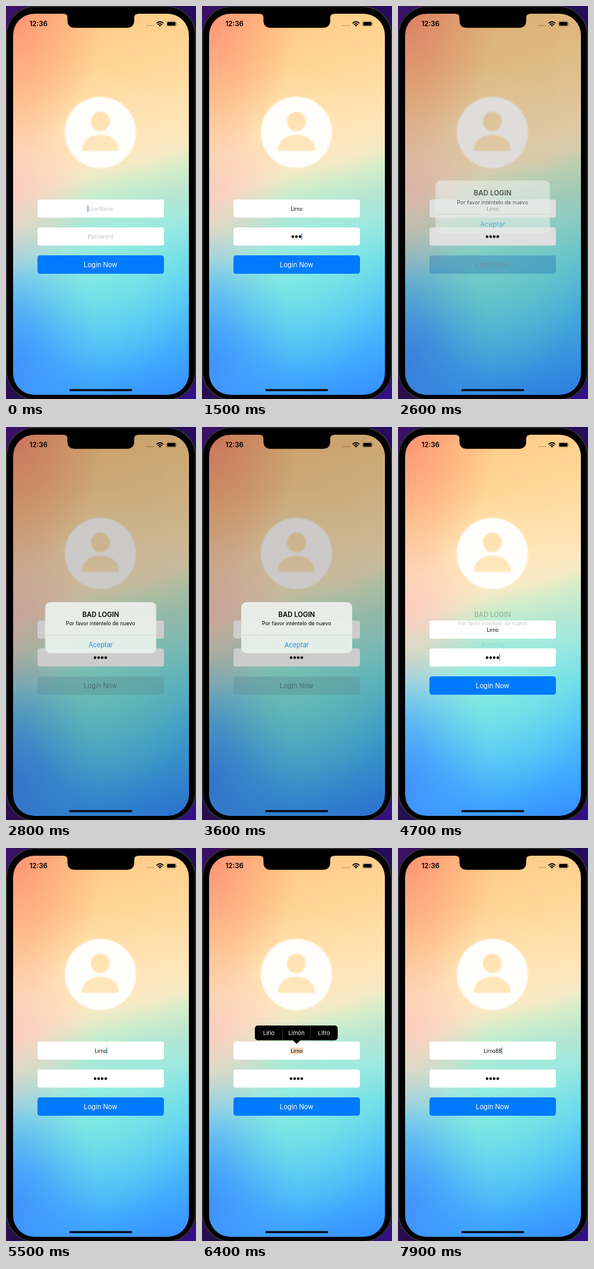
These frames come from a looping animation (320 px wide and 662 px high, 8000 ms). An HTML page:

```html
<!DOCTYPE html>
<html lang="es">
<head>
<meta charset="utf-8">
<title>Login</title>
<style>
  html, body { margin: 0; width: 100%; height: 100%; overflow: hidden; }
  body { position: relative; background: linear-gradient(100deg, #3c1268, #1a0a3c 50%, #34108a); }
  .phone, .screen, svg { position: absolute; }
  .phone {
    left: 0; top: 0; width: 316px; height: 660px;
    border: 2px solid #2e2e32; border-radius: 49px; background: #000;
  }
  .screen {
    left: 11.5px; top: 13px; width: 296px; height: 641.5px; border-radius: 36px;
    background:
      radial-gradient(150px 240px at 0 0, rgba(255, 130, 112, .7), transparent),
      radial-gradient(130px 150px at 0 46%, rgba(250, 192, 190, .7), transparent),
      radial-gradient(150px 120px at 45% 32%, rgba(255, 232, 192, .45), transparent),
      radial-gradient(150px 190px at 54% 66%, rgba(135, 242, 224, .5), transparent),
      radial-gradient(150px 230px at 0 92%, rgba(62, 138, 255, .85), transparent),
      linear-gradient(163deg, #ffba78, #ffca86 6%, #ffd696 20%, #ffe6ba 38%, #f4eac6 43%,
        #d4ecca 47%, #b8e6d2 53%, #a2e8de 59%, #74dee8 68%, #54c8f6 78%, #3ca4ff 92%, #378cff);
  }
  svg { left: 0; top: 0; }
  text { font-family: Inter, "Liberation Sans", sans-serif; text-anchor: middle; }
  .small { font-size: 8.3px; }
  .hint { fill: #c4c4c8; }
  .caret { fill: #2c7fb4; }

  .dim, .alert, .plate, .label, .press, .tint, .grey, .menu { animation: 8s linear infinite; }
  .dim { animation-name: dim; }
  .alert { animation-name: zoom; transform-origin: 159.5px 338px; }
  .plate { animation-name: plate; }
  .label { animation-name: label; }
  .press { animation-name: press; }
  .tint { animation-name: tint; }
  .grey { animation-name: grey; }
  .menu { animation-name: menu; }

  @keyframes dim {
    0%, 30% { opacity: 0; }
    34%, 56.5% { opacity: .2; }
    58.8%, 100% { opacity: 0; }
  }
  @keyframes zoom {
    0%, 30% { transform: scale(1.2); animation-timing-function: cubic-bezier(.2, .7, .3, 1); }
    36.5%, 100% { transform: none; }
  }
  @keyframes plate {
    0%, 30% { opacity: 0; }
    34%, 56.5% { opacity: 1; }
    58.8%, 100% { opacity: 0; }
  }
  @keyframes label {
    0%, 30% { opacity: 0; }
    34%, 56.5% { opacity: 1; }
    59.4%, 100% { opacity: 0; }
  }
  @keyframes press {
    0%, 54% { opacity: 0; }
    55%, 56.5% { opacity: 1; }
    58.7%, 100% { opacity: 0; }
  }
  @keyframes tint {
    0%, 30% { opacity: 1; }
    33.5%, 56.5% { opacity: 0; }
    58.6%, 100% { opacity: 1; }
  }
  @keyframes grey {
    0%, 30% { opacity: 0; }
    33.5%, 56.5% { opacity: 1; }
    58.6%, 100% { opacity: 0; }
  }
  @keyframes menu {
    0%, 74.9% { opacity: 0; }
    75%, 86.2% { opacity: 1; }
    86.3%, 100% { opacity: 0; }
  }
</style>
</head>
<body>
<div class="phone"></div>
<div class="screen"></div>
<svg width="320" height="662" viewBox="0 0 320 662">
  <defs>
    <filter id="soft"><feGaussianBlur stdDeviation=".8"/></filter>
    <clipPath id="card"><rect x="66" y="295" width="187" height="86" rx="9"/></clipPath>
    <linearGradient id="frost" x2="0" y2="1">
      <stop stop-color="#ececea"/>
      <stop offset="1" stop-color="#e3f0e8"/>
    </linearGradient>
  </defs>

  <path filter="url(#soft)" fill="#fffefb" fill-rule="evenodd" d="M99 213a60 60 0 0 1 120 0a60 60 0 0 1-120 0z
    M143 194.500a16 16.500 0 0 0 32 0a16 16.500 0 0 0-32 0z
    M131 244Q127.500 244 128 240C130 225 143 217 159 217S188 225 190 240Q190.500 244 187 244z"/>

  <g fill="#fff">
    <rect x="53" y="326" width="213" height="30.500" rx="4"/>
    <rect x="53" y="373" width="213" height="30.500" rx="4"/>
  </g>
  <g class="tint">
    <rect x="53" y="420" width="213" height="31" rx="4.500" fill="#007aff"/>
    <text x="159.300" y="440" font-size="11.200" fill="#fff">Login Now</text>
  </g>
  <g class="grey">
    <rect x="53" y="420" width="213" height="31" rx="4.500" fill="#6a98a8" opacity=".26"/>
    <text x="159.300" y="440" font-size="11.200" fill="#588699">Login Now</text>
  </g>

  <rect class="menu" x="149" y="336" width="21" height="11" fill="#fbd9c0"/>
  <text id="userHint" class="small hint" x="159.500" y="344.500">UserName</text>
  <text id="user" class="small" x="159.300" y="344.500"></text>
  <text id="passHint" class="hint" x="159.300" y="392" font-size="9.400">Password</text>
  <g id="dots">
    <circle r="2.200"/><circle cx="6" r="2.200"/><circle cx="12" r="2.200"/><circle cx="18" r="2.200"/>
  </g>
  <rect id="caret" class="caret" width="1.200" height="11"/>

  <g class="menu" font-size="9.500" fill="#fff">
    <path fill="#000" d="M94 299H223.500a5 5 0 0 1 5 5V319a5 5 0 0 1-5 5H165.500L159.300 330L153 324H94a5 5 0 0 1-5-5V304a5 5 0 0 1 5-5z"/>
    <path stroke="#3c3c3e" stroke-width=".8" d="M135.500 299v25M182.500 299v25"/>
    <text x="112.500" y="315">Lirio</text>
    <text x="159.200" y="315">Limón</text>
    <text x="205.500" y="315">Litro</text>
  </g>

  <rect class="dim" x="11.500" y="13" width="296" height="641.500" rx="36"/>

  <path d="M96 11H224V13Q216 13 216 19V24Q216 36.800 203 36.800H116Q103.500 36.800 103.500 24V19Q103.500 13 96 13z"/>
  <text x="54.700" y="34" font-size="11.600" font-weight="600">12:36</text>
  <g fill="#000" opacity=".35">
    <circle cx="237.500" cy="33" r="1"/><circle cx="241" cy="33" r="1"/>
    <circle cx="244.500" cy="33" r="1"/><circle cx="248" cy="33" r="1"/>
  </g>
  <g fill="none" stroke="#000" stroke-width="1.700">
    <path d="M253.500 29.200Q259.300 23.800 265.100 29.200M255.700 31.500Q259.300 28.200 262.900 31.500"/>
  </g>
  <path d="M257.300 32.600Q259.300 31 261.300 32.600L259.300 34.700z"/>
  <rect x="270.500" y="26" width="16" height="8" rx="2.400" fill="none" stroke="#000" stroke-opacity=".4" stroke-width=".8"/>
  <rect x="271.500" y="27" width="14" height="6" rx="1.500"/>
  <path d="M287.500 28.500q1.500 1.500 0 3z" opacity=".5"/>
  <rect x="106.500" y="645.300" width="106" height="3.500" rx="1.700" fill="#0b0b14"/>

  <g class="alert">
    <g class="plate" clip-path="url(#card)">
      <rect x="66" y="295" width="187" height="86" fill="url(#frost)" opacity=".97"/>
      <rect class="press" x="66" y="350.500" width="187" height="31" fill="#cdd8cf"/>
      <rect x="66" y="350" width="187" height=".7" fill="#c3cac5"/>
    </g>
    <g class="label">
      <text x="159.400" y="320" font-size="11.300" font-weight="600">BAD LOGIN</text>
      <text x="159.200" y="334" font-size="8.750">Por favor inténtelo de nuevo</text>
      <text x="159.500" y="370.500" font-size="11" fill="#1f8bea">Aceptar</text>
    </g>
  </g>
</svg>
<script>
  const LOOP = 8000;
  const NAME = "Lirno88";
  const nameKeys = [250, 400, 550, 700, 850, 7100, 7400];
  const passKeys = [1150, 1300, 1450, 1650];
  // [time, focused field]
  const focus = [[0, "user"], [1050, "pass"], [2400, ""], [4600, "pass"], [5300, "user"], [6000, ""], [6900, "user"]];
  const $ = id => document.getElementById(id);
  const [user, userHint, passHint, dots, caret] = ["user", "userHint", "passHint", "dots", "caret"].map($);
  const events = [...nameKeys, ...passKeys, ...focus.map(f => f[0])];
  const past = (list, t) => list.filter(k => k <= t);
  const show = (el, on) => { el.style.visibility = on ? "visible" : "hidden"; };

  function render(t) {
    const typed = past(nameKeys, t).length;
    const count = past(passKeys, t).length;
    const field = focus.filter(f => f[0] <= t).pop()[1];
    const blink = (t - Math.max(...past(events, t))) % 1000 < 600;

    user.textContent = NAME.slice(0, typed);
    show(userHint, !typed);
    show(passHint, !count);
    [...dots.children].forEach((dot, i) => show(dot, i < count));
    dots.setAttribute("transform", `translate(${162 - 3 * count} 388.500)`);

    let x = 159.3 + user.getComputedTextLength() / 2;
    if (!typed) x = 137.3;
    if (field === "pass") x = count ? 158.4 + 3 * count : 136.3;
    caret.setAttribute("x", x);
    caret.setAttribute("y", field === "pass" ? 382.5 : 336);
    show(caret, field && blink);
  }

  let start;
  function tick(now) {
    start ??= now;
    render((now - start) % LOOP);
    requestAnimationFrame(tick);
  }
  render(0);
  requestAnimationFrame(tick);
</script>
</body>
</html>
```
